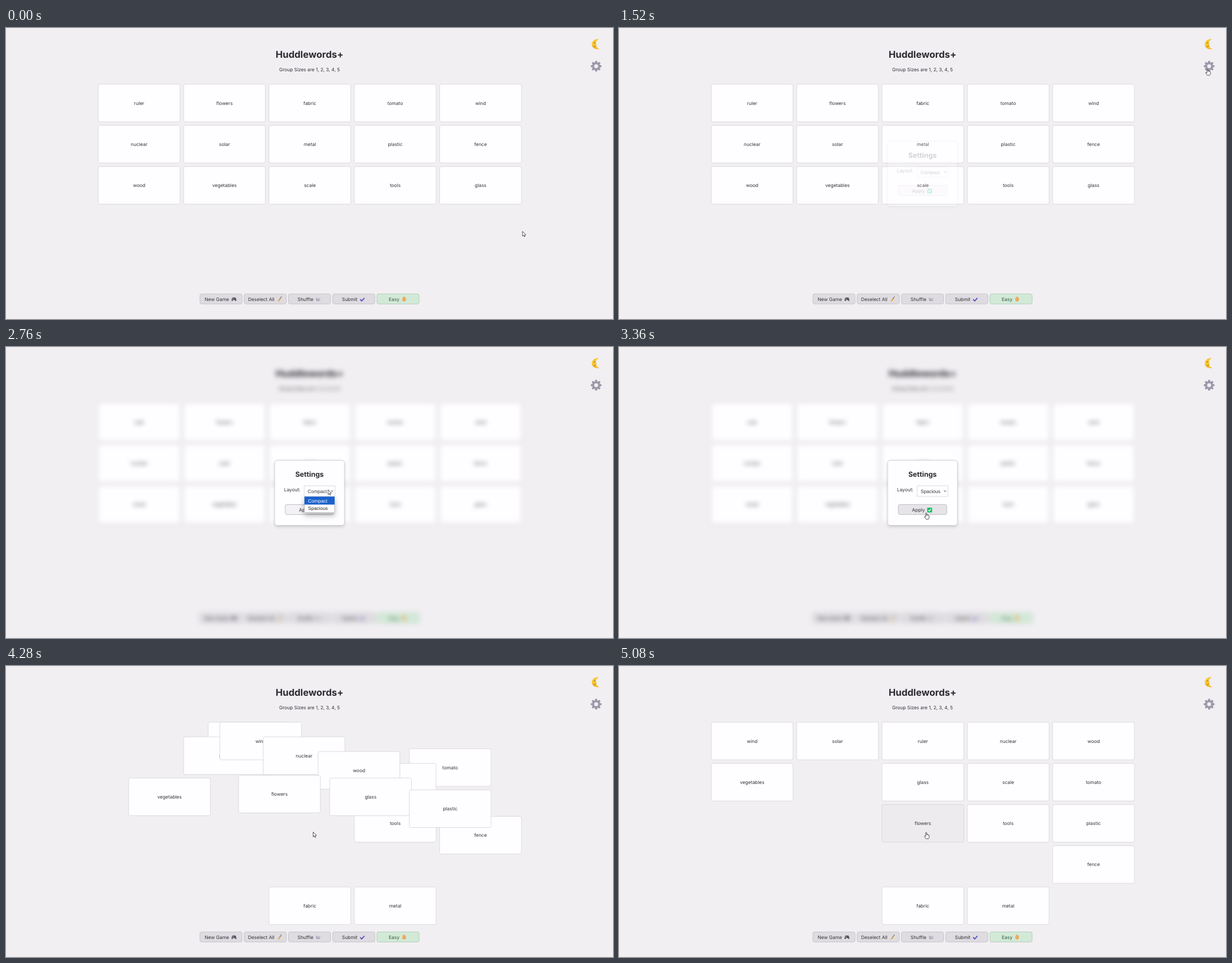
Write an HTML page that moves like this. It is 1080 by 518 pixels and loops after 5280 ms.

```html
<!DOCTYPE html>
<html lang="en">
<head>
<meta charset="utf-8">
<title>Word groups</title>
<style>
  html, body { margin: 0; width: 100%; height: 100%; overflow: hidden; background: #f1eff2; }
  svg { display: block; width: 100vw; height: 100vh; }
  text { font: 8.4px Inter, sans-serif; fill: #343238; text-rendering: geometricPrecision; white-space: pre; }
  .mid { text-anchor: middle; }
  .title { font-size: 16.8px; font-weight: 700; fill: #2c2a30; }
  .heading { font-size: 12.5px; font-weight: 700; fill: #2c2a30; }
  .native { font: 8.5px "Liberation Sans", Arial, sans-serif; }
</style>
</head>
<body>
<svg viewBox="0 0 1080 518" xmlns="http://www.w3.org/2000/svg">
  <defs>
    <filter id="shadow" x="-30%" y="-30%" width="160%" height="170%">
      <feDropShadow dx="0" dy="2" stdDeviation="2.5" flood-color="#000" flood-opacity=".16"/>
    </filter>
    <filter id="listShadow" x="-50%" y="-50%" width="200%" height="250%">
      <feDropShadow dx="0" dy="5" stdDeviation="5" flood-color="#000" flood-opacity=".28"/>
    </filter>
  </defs>
  <rect width="1080" height="518" fill="#f1eff2"/>

  <g id="page">
    <text class="mid title" x="540" y="53">Huddlewords+</text>
    <text class="mid" x="540" y="76.8">Group Sizes are 1, 2, 3, 4, 5</text>
    <g id="tiles"></g>
    <g id="buttons"></g>
    <g id="icons" fill="none" stroke-linecap="round">
      <path d="M402.9 479.8h5.4q1.500 1.800 1.600 5.400q-.6 1.700-2 .2l-1.100-1.200h-2.400l-1.100 1.200q-1.400 1.500-2-.2q.1-3.600 1.600-5.400z" fill="#565161"/>
      <path d="M403.100 482.400h1.800M404 481.500v1.800" stroke="#c9c6cf" stroke-width=".6"/>
      <path d="M490 478.300l-3.200 4.800" stroke="#8d5a3a" stroke-width="1.100"/>
      <path d="M485.900 482l2 1.500l-1.700 3.100h-3.700q2.300-1.700 3.400-4.600z" fill="#e9ad4c"/>
      <path d="M551.800 480.600l2.500 5M555 486l3.800-4.500M552.200 485.200q1.500-4 4-4.200M556 484.500l2.400.6" stroke="#817c9a" stroke-width=".9"/>
      <path d="M630.600 483.500l2.300 2.300l4.300-4.700" stroke="#5b50c2" stroke-width="1.900"/>
      <path d="M708.200 478.300c2.100 0 3.400 3 3.400 5c0 2.200-1.500 3.500-3.400 3.500s-3.400-1.300-3.400-3.500c0-2 1.300-5 3.400-5z" fill="#eba75c"/>
      <path d="M707 480.500q-1 1.300-1 2.700" stroke="#f8cf9a" stroke-width=".9"/>
    </g>
  </g>

  <g id="moon">
    <path d="M1054.800 19.600C1047.800 19.200 1042.300 23.600 1042.300 29C1042.300 34.600 1048 38.800 1055.600 37.400C1051.600 35.400 1049.700 32.700 1050 30.700L1051.300 29.400L1049.500 27.800C1049.300 24.800 1051.200 21.700 1054.800 19.600Z" fill="#f8c62e"/>
    <path d="M1043.300 32.500q3 5 9.500 4.700q-5-1-7.800-6z" fill="#e9a721"/>
    <path d="M1046.200 26.600q1.200-1 2.200.1M1047.300 32.700q1 .3 2-.5" fill="none" stroke="#6b4a1c" stroke-width=".9" stroke-linecap="round"/>
  </g>
  <g id="gear" transform="translate(1050 68)"></g>

  <g id="modal">
    <rect x="478" y="201.700" width="124.200" height="115.800" rx="5" fill="#fefdff" stroke="#c9c7cc" stroke-width=".9" filter="url(#shadow)"/>
    <text class="mid heading" x="540" y="231">Settings</text>
    <text x="494.800" y="257.300">Layout:</text>
    <rect x="530.500" y="247" width="54.700" height="19" fill="#fefdff" stroke="#d2d0d6" stroke-width=".8"/>
    <text id="choice" class="native" x="536.800" y="259.500"></text>
    <path d="M578.200 255.500l1.900 1.900l1.900-1.900" fill="none" stroke="#333" stroke-width="1"/>
    <rect id="apply" x="496.900" y="280.400" width="86.200" height="17.800" rx="3" fill="#f3f1f5" stroke="#b9b7bd" stroke-width=".9"/>
    <text x="521.300" y="293.300">Apply</text>
    <rect x="548.400" y="286" width="8.700" height="8.400" rx="1" fill="#13c25f"/>
    <path d="M550.300 290.200l1.700 1.800l3.200-3.700" fill="none" stroke="#fff" stroke-width="1.200"/>
    <g id="list">
      <rect x="531" y="266.300" width="53.700" height="28.500" rx="1" fill="#fff" stroke="#9a9a9e" stroke-width=".6" filter="url(#listShadow)"/>
      <rect id="marker" x="531" y="266.300" width="53.700" height="14.200" fill="#1a62cc"/>
      <text id="option0" class="native" x="537.500" y="276.500">Compact</text>
      <text id="option1" class="native" x="537.500" y="290.400">Spacious</text>
    </g>
  </g>

  <g id="cursor" stroke="#35333a" stroke-width=".85" stroke-linejoin="round" fill="#fff">
    <path id="arrow" d="M0 0V8.600L2 6.900L3.300 9.700L4.600 9.100L3.300 6.400L5.900 6.200Z"/>
    <path id="hand" d="M-.8 .8Q0-.3 .9 .8V4.600L1 3.700Q1.900 3 2.500 3.900V4.900L2.600 4.300Q3.500 3.700 4 4.500V5.300Q5 4.700 5.300 5.600V8Q5.300 10 4 11.600H-.2Q-1.600 9.800-3.200 7.600Q-3.300 6.200-1.900 6.700L-.8 7.700Z"/>
  </g>
</svg>

<script>
const LOOP = 5280;
const MOVE_START = 3954, MOVE_TIME = 874;
const $ = id => document.getElementById(id);
const clamp = v => Math.min(1, Math.max(0, v));
const ramp = (t, a, b) => clamp((t - a) / (b - a));
const mix = (a, b, k) => a + (b - a) * k;
const show = (id, on) => $(id).setAttribute('display', on ? 'inline' : 'none');

// CSS "ease": cubic-bezier(.25, .1, .25, 1)
function ease(x) {
  let lo = 0, hi = 1;
  for (let i = 0; i < 24; i++) {
    const s = (lo + hi) / 2;
    if (.75 * s - .75 * s * s + s ** 3 < x) lo = s; else hi = s;
  }
  return .3 * lo * (1 - lo) ** 2 + 3 * (1 - lo) * lo * lo + lo ** 3;
}

// Back to front: word, start cell, end cell (column + 5 * row), time the pointer ends its glide
const tiles = [
  ['ruler', 0, 2], ['solar', 6, 1], ['wind', 4, 0], ['nuclear', 5, 3],
  ['tomato', 3, 9], ['scale', 12, 8, 3956], ['wood', 10, 4], ['tools', 13, 13],
  ['fence', 9, 19], ['glass', 14, 7], ['plastic', 8, 14], ['flowers', 1, 12, 4493],
  ['vegetables', 11, 5], ['fabric', 2, 22, 4190], ['metal', 7, 23, 4120]
].map(([word, from, to, snap = Infinity]) => ({ word, from, to, snap }));

const cellX = n => 164.1 + 151.87 * (n % 5);
const cellY = n => 100 + 73.3 * Math.floor(n / 5);

$('tiles').innerHTML = tiles.map(({ word }) => `<g>
  <rect width="145.500" height="67" rx="3" fill="#fefdff" stroke="#d8d6db" stroke-width=".9"/>
  <text class="mid" x="72.800" y="36.600">${word}</text></g>`).join('');
tiles.forEach((tile, i) => {
  tile.node = $('tiles').children[i];
  tile.box = tile.node.firstElementChild;
});

$('buttons').innerHTML = [
  ['New Game', 353.5], ['Deselect All', 430.7], ['Shuffle', 518.8], ['Submit', 597.8], ['Easy', 681]
].map(([label, x], i) => {
  const easy = i === 4;
  return `<rect x="${345 + 78.75 * i}" y="473.400" width="75" height="17.800" rx="3"
    fill="${easy ? '#d3e9d8' : '#dedce0'}" stroke="${easy ? '#acccb4' : '#c3c1c6'}" stroke-width=".9"/>
    <text x="${x}" y="485.600"${easy ? ' style="fill:#2f5a3b"' : ''}>${label}</text>`;
}).join('');

$('gear').innerHTML = [...Array(8).keys()].map(i =>
  `<path d="M-2.200-6L-1.600-9.500H1.600L2.200-6Z" fill="#9a97a8" transform="rotate(${i * 45})"/>`
).join('') + '<circle r="5.300" fill="none" stroke="#9a97a8" stroke-width="3.600"/>' +
  '<circle r="4" fill="none" stroke="#b5b2bf" stroke-width=".7"/>';

// Pointer path: time, x, y
const path = [
  [0, 919, 362], [80, 921, 358], [300, 972, 252], [580, 1019, 150], [840, 1041, 86],
  [980, 1047, 72.5], [1560, 1047, 72.5], [1760, 950, 162], [2000, 814, 254.5],
  [2220, 680, 262], [2480, 573, 254], [2820, 573, 254], [2980, 560, 284],
  [3160, 560, 284], [3360, 546.5, 295], [LOOP, 546.5, 296]
];
function pointer(t) {
  const i = path.findIndex(p => p[0] > t);
  const [a, b] = [path[i - 1], path[i]];
  const k = ramp(t, a[0], b[0]);
  return [mix(a[1], b[1], k), mix(a[2], b[2], k)];
}

function drawTiles(t) {
  const glide = ease(ramp(t, MOVE_START, MOVE_START + MOVE_TIME));
  for (const { word, from, to, snap, node, box } of tiles) {
    const k = t >= snap ? 1 : glide;
    const x = mix(cellX(from), cellX(to), k), y = mix(cellY(from), cellY(to), k);
    node.setAttribute('transform', `translate(${x} ${y})`);
    const hover = word === 'flowers' ? ramp(t, snap, snap + 200) : 0;
    const shade = [254, 253, 255].map((c, i) => Math.round(mix(c, [237, 235, 238][i], hover)));
    box.setAttribute('fill', `rgb(${shade})`);
  }
}

function drawModal(t) {
  const opacity = ramp(t, 1480, 1680) * (1 - ramp(t, 3560, 3740));
  $('modal').setAttribute('opacity', opacity);
  show('modal', opacity > 0);
  show('list', t >= 2680 && t < 3160);
  const second = t >= 2920;
  $('marker').setAttribute('y', second ? 280.5 : 266.3);
  $('option0').style.fill = second ? '#222' : '#fff';
  $('option1').style.fill = second ? '#fff' : '#222';
  $('choice').textContent = t < 3160 ? 'Compact' : 'Spacious';
  $('apply').setAttribute('fill', t >= 3300 ? '#e6e4e9' : '#f3f1f5');
}

function draw(t) {
  const blur = 4 * ease(ramp(t, 1480, 1780)) * (1 - ramp(t, 3940, 4220));
  $('page').style.filter = blur > .02 ? `blur(${blur}px)` : 'none';
  drawTiles(t);
  drawModal(t);
  const [x, y] = pointer(t);
  $('cursor').setAttribute('transform', `translate(${x} ${y})`);
  const hand = (t >= 940 && t < 1600) || (t >= 3300 && t < 3740) || t >= 4493;
  show('hand', hand);
  show('arrow', !hand);
}

const start = performance.now();
function tick() {
  draw((performance.now() - start) % LOOP);
  requestAnimationFrame(tick);
}
draw(0);
requestAnimationFrame(tick);
</script>
</body>
</html>
```
